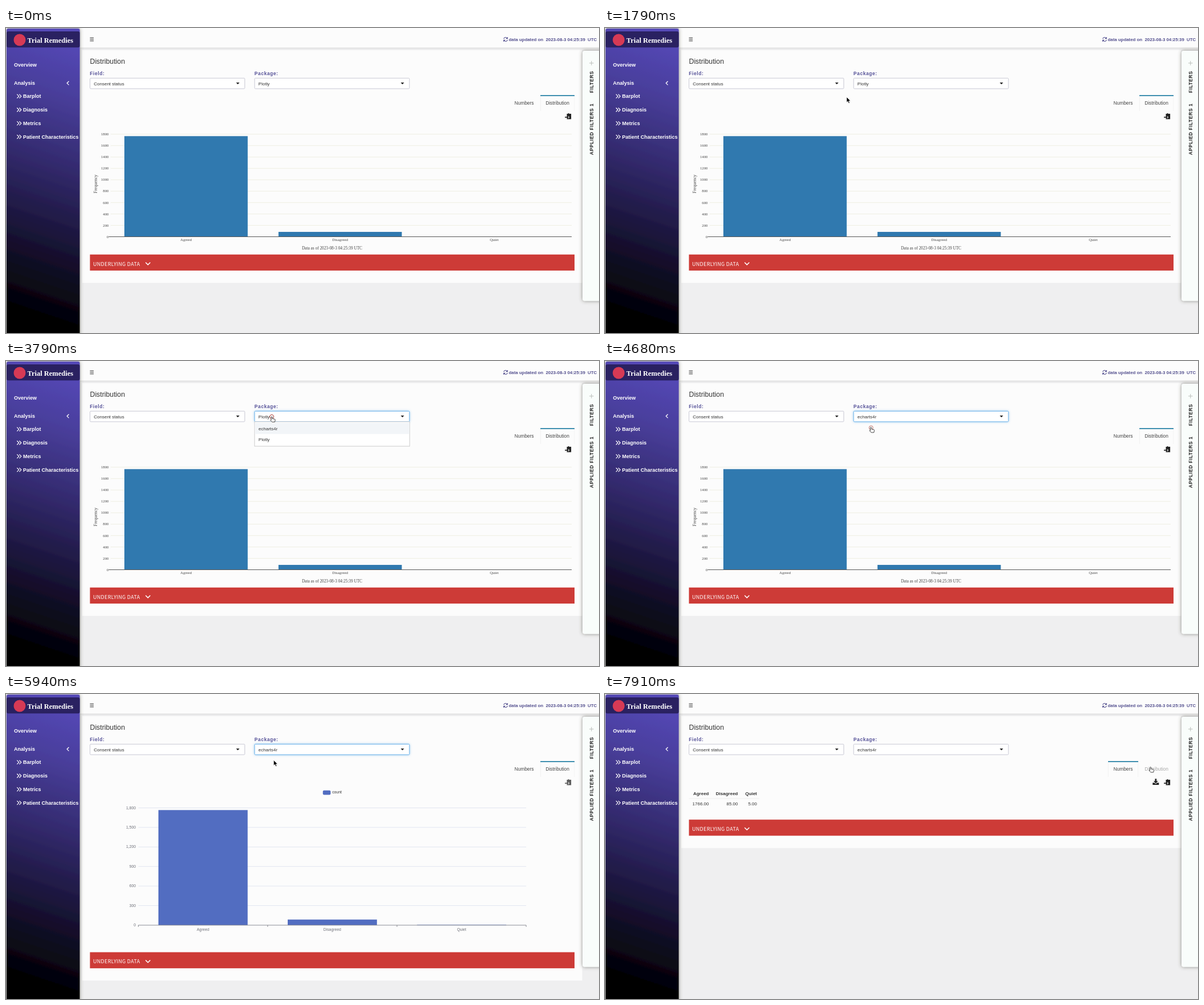
Recreate the animation shown at these times as an HTML page. Size 1042 by 537 pixels, loop 7.99 s.

```html
<!DOCTYPE html>
<html lang="en">
<head>
<meta charset="utf-8">
<style>
html, body { margin: 0; width: 100%; height: 100%; overflow: hidden; background: #efeff0; }
svg { display: block; width: 1042px; height: 537px; font-family: "Liberation Sans", Arial, sans-serif; }
text { white-space: pre; }
.b { font-weight: bold; }
.serif { font-family: "Liberation Serif", Times, serif; }
.cjk { font-family: "Noto Sans CJK JP", "Noto Sans CJK SC", "Noto Sans", sans-serif; }
.line { fill: none; stroke: #222; }
</style>
</head>
<body>
<svg id="stage" viewBox="0 0 1042 537"></svg>
<script>
const LOOP = 7990;
const CHART_AT = 4895, NUMBERS_AT = 7180;
const OPEN_AT = 3790, PICK_AT = 4600;
const GROW = 1000;
const counts = { Agreed: 1766, Disagreed: 85, Quiet: 5 };
const names = Object.keys(counts);

const attrs = o => Object.entries(o).map(([k, v]) => `${k}="${v}"`).join(' ');
const rect = (x, y, w, h, fill, o = {}) =>
  `<rect x="${x}" y="${y}" width="${w}" height="${h}" fill="${fill}" ${attrs(o)}/>`;
const text = (s, x, y, size, fill, o = {}) =>
  `<text x="${x}" y="${y}" font-size="${size}" fill="${fill}" ${attrs(o)}>${s}</text>`;
const path = (d, stroke, width = 1, o = {}) =>
  `<path d="${d}" class="line" style="stroke:${stroke}" stroke-width="${width}" ${attrs(o)}/>`;
const group = (id, body) => `<g id="${id}">${body}</g>`;
const bold = { class: 'b' };
const end = { 'text-anchor': 'end' };
const mid = { 'text-anchor': 'middle' };
const range = n => [...Array(n).keys()];

function sidebar() {
  const items = ['Barplot', 'Diagnosis', 'Metrics', 'Patient Characteristics'];
  const rows = items.map((s, i) => {
    const y = 120.2 + i * 23.8;
    return path(`M19.3 ${y - 3.5}l3.5 3.5l-3.5 3.5m4-7l3.5 3.5l-3.5 3.5`, '#fff', 1.2) +
      text(s, 30, y + 3.1, 9, '#fff', bold);
  });
  return rect(0, 0, 2, 537, '#fafafa') +
    rect(1, 1, 128.6, 545, 'url(#side)', { rx: 3, filter: 'url(#sideShadow)' }) +
    rect(1, 6, 128.6, 28.3, '#2a2161', { rx: 3 }) +
    '<circle cx="24" cy="21" r="10.5" fill="#d63a55"/>' +
    text('Trial Remedies', 37.5, 26, 12.5, '#fff', { class: 'b serif' }) +
    text('Overview', 14, 68, 9, '#fff', bold) +
    text('Analysis', 14, 100, 9, '#fff', bold) +
    path('M110.5 93.8l-3.3 3.3l3.3 3.3', '#fff', 1.3) + rows.join('');
}

function header() {
  return rect(130, -10, 920, 44.3, '#fcfcfc', { filter: 'url(#soft)' }) +
    path('M147.5 17.2h6.6m-6.6 2.8h6.6m-6.6 2.8h6.6', '#333', 1.1) +
    path('M874.6 19.2a3.3 3.3 0 0 1 6-1.2m.6-2v2.6h-2.6M881.2 20.8a3.3 3.3 0 0 1-6 1.2m-.6 2v-2.6h2.6', '#54508f', 1.1) +
    text('data updated on', 883.5, 23, 7.85, '#54508f', bold) +
    text('2023-08-3 04:25:39', 948.5, 23, 7.85, '#54508f', bold) +
    text('UTC', 1022, 23, 7.85, '#54508f', bold);
}

function filters() {
  const side = (s, y) => text(s, 0, 0, 8.5, '#222',
    { class: 'b', 'letter-spacing': .57, transform: `translate(1032 ${y}) rotate(-90)` });
  return rect(1013, 40, 40, 440.5, '#f9fdfb', { rx: 4, filter: 'url(#sideShadow)' }) +
    path('M1025 61.8h7.6m-3.8-3.8v7.6', '#b4b8b4', .9) +
    side('FILTERS', 114.3) + side('APPLIED FILTERS 1', 223.5);
}

function select(id, label, x) {
  return text(label, x, 82.7, 8.5, '#575399', { class: 'b', 'letter-spacing': .57 }) +
    rect(x + .3, 88.3, 272, 18.6, '#fff', { id: id + 'Box', rx: 1.5, stroke: '#c8c8d4' }) +
    text('', x + 7, 100.7, 8, '#333', { id: id + 'Value' }) +
    `<path d="M${x + 257} 96h6l-3 3.2z" fill="#222"/>`;
}

function plotly() {
  const yOf = v => 367.5 - v * .1003;
  const font = { class: 'serif' };
  const grid = range(10).map(i => {
    const y = yOf(i * 200);
    return (i ? path(`M184 ${y}H994`, '#eeeee2', 1) : '') +
      text(i * 200, 180.5, y + 2.2, 6.8, '#444', { ...font, ...end });
  });
  const bars = names.map((n, i) => {
    const x = 208 + i * 270.8, y = yOf(counts[n]);
    return rect(x, y, 216.7, 367.5 - y, '#3079af') +
      text(n, x + 108.3, 375, 6.8, '#444', { ...font, ...mid });
  });
  return grid.join('') + bars.join('') + path('M180.5 367.5H994', '#555', 1) +
    text('Frequency', 0, 0, 7.8, '#444', { ...font, ...mid, transform: 'translate(159.6 274.5) rotate(-90)' }) +
    text('Data as of 2023-08-3 04:25:39 UTC', 573, 390.3, 7.3, '#444', { ...font, ...mid });
}

function echarts() {
  const grid = range(7).map(i => {
    const y = 406.9 - i * 34.4;
    return (i ? path(`M232.5 ${y}H914`, '#e2e6f1', 1) : '') +
      text((i * 300).toLocaleString('en-US'), 228, y + 2, 6.8, '#6e7079', end);
  });
  const bars = names.map((n, i) => {
    const x = 267.8 + i * 227.2;
    return rect(x, 400, 156.8, 0, '#526dc1', { class: 'bar' }) +
      text(n, x + 78.3, 416.5, 6.8, '#6e7079', mid);
  });
  return grid.join('') + bars.join('') +
    path('M232.5 410v-3H914v3M459.8 407v3M687 407v3', '#6e7079', .8) +
    rect(556.8, 169.8, 13.6, 7.6, '#526dc1', { rx: 2 }) +
    text('count', 573.2, 175.4, 6.8, '#333');
}

function table() {
  const right = [182.5, 233.5, 267];
  return path('M147.5 184H271', '#ededed', 1) + names.map((n, i) =>
    text(n, right[i], 178.2, 8, '#333', { ...bold, ...end }) +
    text(counts[n].toFixed(2), right[i], 196, 8, '#333', end)).join('');
}

function tab(id, label, x, w) {
  return group(id + 'Active', path(`M${x + .3} 119v27M${x + w - .3} 119v27`, '#f0f0f0', .8) +
      rect(x, 118, w, 2, '#3f8fb0')) +
    text(label, x + w / 2, 135.2, 8.35, '#444', { id: id + 'Label', ...mid });
}

const clipboard = '<g id="clip" fill="#222"><path d="M985.5 151h2q1-2.4 2 0h3.6v9.4h-7.6v-2.2h2.3v1.2l2.4-2.3-2.4-2.3v1.3h-2.3z"/>' +
  '<path d="M982.2 156.2h4v-1.7l2.6 2.6-2.6 2.6v-1.7h-4z"/></g>';
const download = '<g id="download" fill="#222"><path d="M966.4 149.3h2.8v4h2.6l-4 4.2-4-4.2h2.6z"/>' +
  '<path d="M962.3 156.2h3l2.5 2.3 2.5-2.3h3v3.8h-11z"/></g>';

const dropdown = () => rect(436.8, 107, 272.5, 43, '#fff', { stroke: '#ccc' }) +
  rect(437.3, 109, 271.5, 19.5, '#f2f5f8') +
  text('echarts4r', 443.8, 121.7, 8, '#333') + text('Plotly', 443.8, 141.3, 8, '#333');

const accordion = () => rect(147.5, 0, 851.5, 28.3, '#cd3b37') +
  text('UNDERLYING DATA', 153, 19.9, 9, '#fff', { class: 'cjk', 'letter-spacing': .3 }) +
  path('M245.3 14l4.1 4.1l4.1-4.1', '#fff', 1.5);

const stage = document.getElementById('stage');
stage.innerHTML = `<defs>
  <linearGradient id="side" x1=".5" y1="0" x2=".42" y2="1">
    <stop offset="0" stop-color="#5548b8"/><stop offset=".18" stop-color="#4a3f9d"/>
    <stop offset=".4" stop-color="#352c72"/><stop offset=".7" stop-color="#161130"/>
    <stop offset=".93" stop-color="#010103"/></linearGradient>
  <filter id="sideShadow" x="-30%" y="-5%" width="160%" height="110%">
    <feDropShadow dx="0" dy="0" stdDeviation="3" flood-color="#444438" flood-opacity=".6"/></filter>
  <filter id="soft" y="-20%" height="150%">
    <feDropShadow dx="0" dy="1" stdDeviation="1.5" flood-opacity=".12"/></filter>
</defs>` +
  rect(0, 0, 1042, 537, '#efeff0') +
  rect(134, 39, 878.5, 400, '#fcfcfc', { id: 'panel' }) +
  header() + sidebar() +
  text('Distribution', 147.5, 62.8, 12.3, '#333') +
  select('field', 'Field:', 147.3) + select('package', 'Package:', 436.6) +
  tab('numbers', 'Numbers', 884, 53) + tab('dist', 'Distribution', 939, 60) +
  clipboard + download +
  group('plotly', plotly()) + group('echarts', echarts()) + group('table', table()) +
  group('accordion', accordion()) + group('dropdown', dropdown()) + filters() +
  '<circle id="ring" r="3.5" fill="none" stroke="#a33a34"/>' +
  group('cursor',
    '<path id="arrow" d="M0 0v9.5l2.2-2 1.6 3.5 1.7-.8-1.5-3.3h3z" fill="#000" stroke="#fff" stroke-width=".7"/>' +
    '<path id="hand" d="M-1 6V.6Q0-.7 1 .6V3.5l4 .8q1.2.3 1 1.7l-.8 3.4H.7L-2.5 6.3q.4-1.2 1.5-.3z" fill="#fff" stroke="#333" stroke-width=".9"/>');

const $ = id => document.getElementById(id);
const set = (el, o) => Object.entries(o).forEach(([k, v]) => el.setAttribute(k, v));
const show = (id, on) => set($(id), { visibility: on ? 'visible' : 'hidden' });
$('fieldValue').textContent = 'Consent status';

// time, x, y, hand pointer
const route = [
  [1250, 520, 540, 0], [1790, 424.5, 121.5, 0], [2150, 424, 121, 0], [2450, 400, 103, 1],
  [2600, 391, 96, 1], [3000, 391, 96, 1], [3250, 421, 97, 0], [3330, 437, 98, 1],
  [3600, 467, 98, 1], [4000, 467, 98, 1], [4350, 467.3, 116.5, 1], [5900, 467.3, 116.5, 0],
  [6750, 905, 117, 0], [6870, 909.5, 118.5, 0], [7000, 912, 128, 1],
  [7450, 912, 128, 1], [7850, 958.5, 128.5, 1], [LOOP, 958.5, 128.5, 1]
];
const clicks = [[OPEN_AT, 467, 98], [PICK_AT, 467.5, 117.5], [NUMBERS_AT - 60, 912, 129]];

function pointer(t) {
  const i = route.findIndex(p => p[0] > t);
  if (i < 1) return null;
  const [a, b] = [route[i - 1], route[i]];
  const p = (t - a[0]) / (b[0] - a[0]), e = p * p * (3 - 2 * p);
  return { x: a[1] + (b[1] - a[1]) * e, y: a[2] + (b[2] - a[2]) * e, hand: a[3] };
}

function draw(t) {
  const numbers = t >= NUMBERS_AT, chart = !numbers && t >= CHART_AT;
  const top = numbers ? 221.2 : chart ? 454.6 : 398.8;
  const focus = t >= OPEN_AT && !numbers;
  show('plotly', !numbers && !chart);
  show('echarts', chart);
  show('table', numbers);
  show('download', numbers);
  show('numbersActive', numbers);
  show('distActive', !numbers);
  show('dropdown', t >= OPEN_AT && t < PICK_AT);
  set($('clip'), { opacity: chart ? .72 : 1 });
  set($('panel'), { height: top + 11 });
  set($('accordion'), { transform: `translate(0 ${top})` });
  set($('packageBox'), { stroke: focus ? '#66afe9' : '#c8c8d4' });
  $('packageBox').style.filter = focus ? 'drop-shadow(0 0 2px #66afe999)' : 'none';
  $('packageValue').textContent = t < PICK_AT ? 'Plotly' : 'echarts4r';

  const p = Math.min(1, Math.max(0, (t - CHART_AT) / GROW));
  const grown = 1 - (1 - p) ** 3;
  document.querySelectorAll('.bar').forEach((bar, i) => {
    const h = counts[names[i]] * .1147 * grown;
    set(bar, { y: 406.9 - h, height: h });
  });

  const c = pointer(t);
  $('cursor').style.display = c ? '' : 'none';
  if (c) {
    set($('cursor'), { transform: `translate(${c.x} ${c.y})` });
    show('hand', c.hand);
    show('arrow', !c.hand);
  }
  set($('distLabel'), { fill: numbers && c.x > 939 ? '#aaa' : '#444' });
  const click = clicks.find(k => t >= k[0] && t < k[0] + 160);
  show('ring', click);
  if (click) set($('ring'), { cx: click[1], cy: click[2], opacity: 1 - (t - click[0]) / 260 });
}

const start = performance.now();
function tick(now) {
  draw(Math.max(0, now - start) % LOOP);
  requestAnimationFrame(tick);
}
draw(0);
requestAnimationFrame(tick);
</script>
</body>
</html>
```
